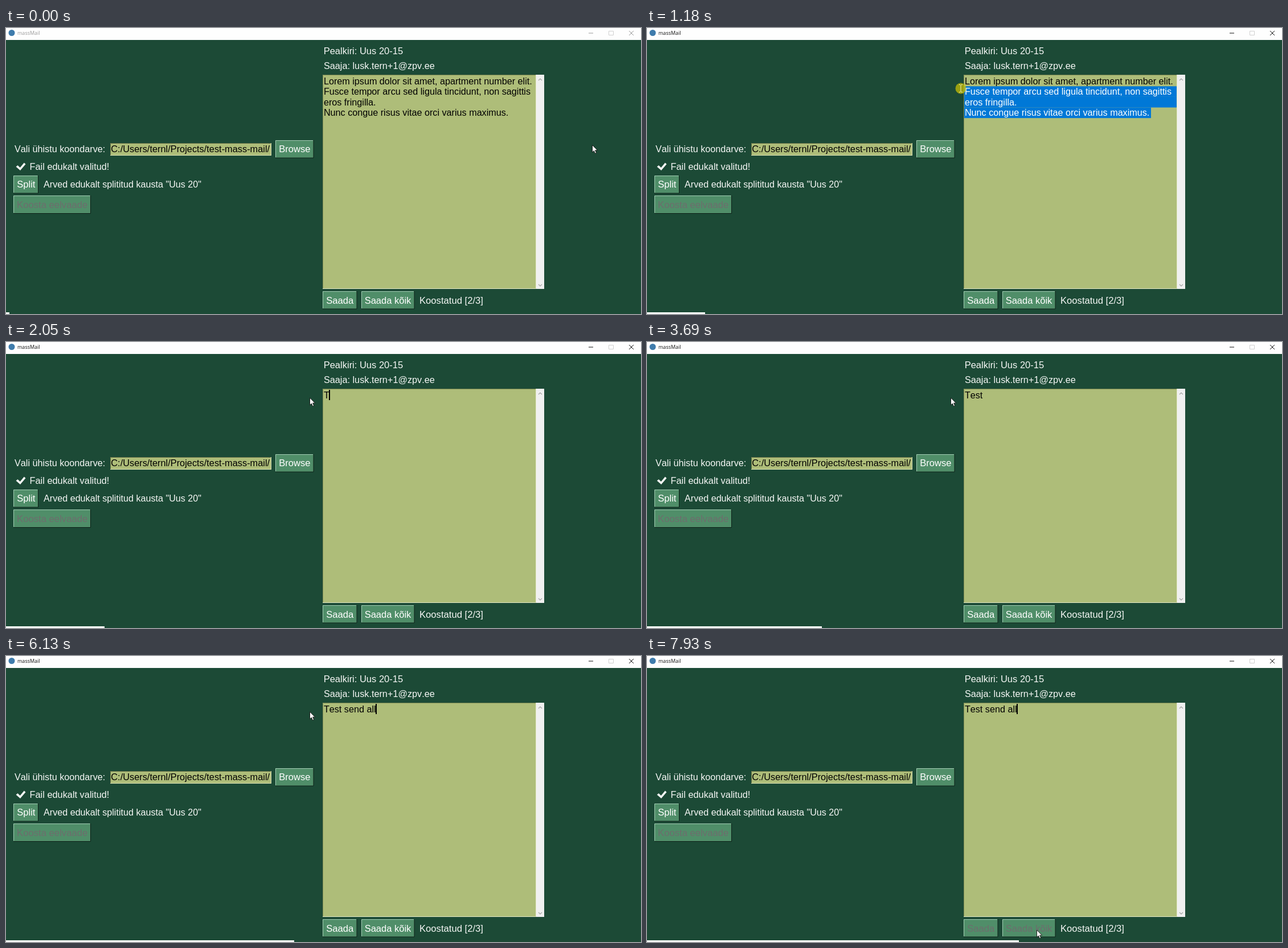
These frames come from a looping animation (1115x502 px, 8 s). An HTML page:

```html
<!DOCTYPE html>
<html lang="et">
<head>
<meta charset="utf-8">
<title>massMail</title>
<style>
html, body { margin: 0; width: 100%; height: 100%; overflow: hidden; background: #1c4a36; }
svg { display: block; width: 1115px; height: 502px; }
text { font-family: "Liberation Sans", Arial, sans-serif; font-kerning: none; white-space: pre; }
.title { font: 9px "Open Sans", sans-serif; }
</style>
</head>
<body>
<svg id="stage" viewBox="0 0 1115 502" xmlns="http://www.w3.org/2000/svg"></svg>
<script>
const NS = "http://www.w3.org/2000/svg";
const stage = document.getElementById("stage");
const LOOP = 8000, STEP = 78.5;
const INK = "#000", PALE = "#f6f8f6", FIELD = "#aebd79", GREY = "#6d6d6d";

function add(tag, attrs, parent = stage) {
  const el = document.createElementNS(NS, tag);
  for (const key in attrs) el.setAttribute(key, attrs[key]);
  return parent.appendChild(el);
}
const rect = (x, y, width, height, fill, parent) => add("rect", { x, y, width, height, fill }, parent);
const path = (d, attrs, parent) => add("path", { d, fill: "none", ...attrs }, parent);
function label(str, x, y, size, fill = PALE, parent) {
  const el = add("text", { x, y, "font-size": size, fill }, parent);
  el.textContent = str;
  return el;
}
const show = (el, on) => el.setAttribute("visibility", on ? "visible" : "hidden");

function button(str, x, y, w, h, tx, ty, size, fill = "#fff") {
  rect(x, y, w, h, "#508e69");
  const lit = path(`M${x + .5} ${y + h - 1}V${y + .5}H${x + w - 1}`);
  const dark = path(`M${x} ${y + h}H${x + w}V${y}`);
  const text = label(str, tx, ty, size, fill);
  const setSunken = on => {
    lit.setAttribute("stroke", on ? "#0c2018" : "#a4cfb5");
    dark.setAttribute("stroke", on ? "#a4cfb5" : "#0c2018");
    text.setAttribute("transform", on ? "translate(1 1)" : "");
  };
  setSunken(false);
  return { text, setSunken };
}

// Window frame
rect(0, 0, 1115, 502, "#1c4a36");
rect(0, 0, 1115, 21, "#fefefe");
add("circle", { cx: 10, cy: 8.5, r: 5.5, fill: "#3f7cac" });
const title = label("massMail", 20, 12, 9);
title.setAttribute("class", "title");
const minimise = path("M1023 9H1031");
path("M1058.5 5.5H1066.5V12.5H1058.5Z", { stroke: "#d0d0d0" });
const closer = path("M1094 5L1102 13M1102 5L1094 13");

// Left column
label("Vali ühistu koondarve:", 15, 218, 16.2);
rect(183, 202, 283, 22, FIELD);
path("M183.5 223V202.5H466", { stroke: "#687248" });
path("M183 223.5H465.5V202", { stroke: "#dbe2b6" });
label("C:/Users/ternl/Projects/test-mass-mail/", 184.3, 218, 16.35, INK);
button("Browse", 473, 197, 67, 31, 479.2, 218, 16.6);
path("M17.5 243.5L20.5 241L24.7 245L31.8 236.5L34.5 239L25 250Z", { fill: PALE });
label("Fail edukalt valitud!", 41.5, 249, 16.35);
button("Split", 13, 259, 43.5, 31, 19.3, 280, 16.5);
label('Arved edukalt splititud kausta "Uus 20"', 66, 280, 16.15);
button("Koosta eelvaade", 13, 294, 135.5, 31.5, 19, 316, 16.7, GREY);

// Right column
label("Pealkiri: Uus 20-15", 557.7, 46, 16.5);
label("Saaja: lusk.tern+1@zpv.ee", 557.9, 72, 16.25);
rect(556, 82, 375, 376, FIELD);
path("M556.5 458V82.5H931", { stroke: "#7c8853" });
path("M556 457.5H930.5V82", { stroke: "#e3e8c6" });
rect(931, 82, 14, 376, "#f0f0f0");
path("M935 92L938 89L941 92M935 450L938 453L941 450", { stroke: "#a3a3a3", "stroke-width": 1.2 });
const send = button("Saada", 556, 462, 60, 31, 562.3, 483.5, 16.6);
const sendAll = button("Saada kõik", 624, 462, 93, 31, 629.7, 483.5, 16.5);
label("Koostatud [2/3]", 726, 483.5, 16.65);

// Message text and its selection
const TEXT_X = 557.9, LINE = 18.6, SIZE = 16.18;
const lines = [
  "Lorem ipsum dolor sit amet, apartment number elit.",
  "Fusce tempor arcu sed ligula tincidunt, non sagittis",
  "eros fringilla.",
  "Nunc congue risus vitae orci varius maximus."
];
const rowTop = i => 83.7 + LINE * i;
const message = add("g", {});
const clip = add("clipPath", { id: "picked" });
const writeLines = (fill, parent) =>
  lines.forEach((s, i) => label(s, TEXT_X, 98.6 + LINE * i, SIZE, fill, parent));
writeLines(INK, message);
const marks = lines.map((_, i) => {
  const box = [0, rowTop(i), 0, LINE];
  const mark = rect(...box, "#0078d7", message);
  return [mark, rect(...box, "#000", clip)];
});
writeLines("#fff", add("g", { "clip-path": "url(#picked)" }, message));

const typed = label("", TEXT_X, 98.6, SIZE, INK);
const caret = rect(0, 84, 2, 18, INK);
const progress = rect(0, 499, 6, 3, "#fbfdfb");

// Pointer
const pointer = add("g", {});
const halo = add("circle", { r: 9.5, fill: "#d6ca00", "fill-opacity": .68 }, pointer);
const beam = path("M-3 -6.5H-1L0 -5.5L1 -6.5H3M0 -5.5V5.5M-3 6.5H-1L0 5.5L1 6.5H3", {}, pointer);
const arrow = path("M.5 .5V13.2L3.4 10.5L5.4 15.2L7.6 14.2L5.6 9.7H9.6Z",
  { fill: "#fff", stroke: "#111", "stroke-width": .9 }, pointer);

// Step, x, y
const route = [
  [0, 1029, 205], [2, 1029, 205], [8, 893, 150], [9, 893, 150], [15, 551, 106],
  [17, 546, 88], [18, 546, 88], [21, 533, 97.5], [78, 533, 97.5], [87, 684, 480.5]
];
const PRESS = 9, RELEASE = 18, ERASE = 24, CLICK = 97, DISABLE = 100;
const phrase = "Test send all";
const keySteps = [25, 30, 33, 37, 40, 48, 51, 54, 57, 58, 60, 61, 62];

const blocks = [80, 940, 1810, 2660, 3530, 4400, 5270, 6130, 7000, 7850, 8730];
function stepAt(t) {
  if (t < blocks[0]) return 0;
  let i = 0;
  while (t >= blocks[i + 1]) i++;
  const part = (t - blocks[i]) / (blocks[i + 1] - blocks[i]);
  return 1 + i * 11 + Math.min(10, Math.floor(part * 11 + .2));
}

function pointAt(step) {
  const i = route.findIndex(p => p[0] > step);
  if (i < 0) return route[route.length - 1].slice(1);
  const [s0, x0, y0] = route[i - 1], [s1, x1, y1] = route[i];
  const u = (step - s0) / (s1 - s0), e = u * u * (3 - 2 * u);
  return [x0 + (x1 - x0) * e, y0 + (y1 - y0) * e];
}

function drawSelection(step) {
  const [x, y] = pointAt(Math.min(step, RELEASE));
  const row = Math.max(0, Math.min(3, Math.floor((y - rowTop(0)) / LINE)));
  marks.forEach((pair, i) => {
    const left = i === row ? Math.max(557, x) : 557;
    const right = i === 3 ? 885 : 930;
    const width = step >= PRESS && i >= row ? Math.max(0, right - left) : 0;
    for (const r of pair) {
      r.setAttribute("x", left);
      r.setAttribute("width", width);
    }
  });
}

function drawPointer(step) {
  const [x, y] = pointAt(step);
  const dragging = step >= PRESS && step <= RELEASE;
  const inField = x > 556 && x < 931 && y > 82 && y < 458;
  pointer.setAttribute("transform", `translate(${x} ${y})`);
  show(halo, dragging || (step >= CLICK && step < DISABLE));
  show(beam, inField || dragging);
  show(arrow, !(inField || dragging));
  beam.setAttribute("stroke", x < 557 ? "#f3efb4" : INK);
}

function draw(t) {
  const step = stepAt(t);
  const active = step >= PRESS;
  title.setAttribute("fill", active ? "#111" : "#999");
  for (const el of [minimise, closer]) el.setAttribute("stroke", active ? "#111" : "#999");

  const erased = step >= ERASE;
  message.setAttribute("display", erased ? "none" : "inline");
  drawSelection(step);
  const count = keySteps.filter(k => k <= step).length;
  typed.textContent = phrase.slice(0, count);
  const width = count ? typed.getComputedTextLength() : 0;
  caret.setAttribute("x", Math.round(TEXT_X + width - 1));
  show(caret, erased && (step * STEP - 215 + 900) % 900 < 600);

  sendAll.setSunken(step >= CLICK && step < DISABLE);
  for (const b of [send, sendAll]) b.text.setAttribute("fill", step >= DISABLE ? GREY : "#fff");
  progress.setAttribute("width", Math.round(6 + step * 6.41));
  drawPointer(step);
}

const start = performance.now();
function tick() {
  draw((performance.now() - start) % LOOP);
  requestAnimationFrame(tick);
}
tick();
</script>
</body>
</html>
```
